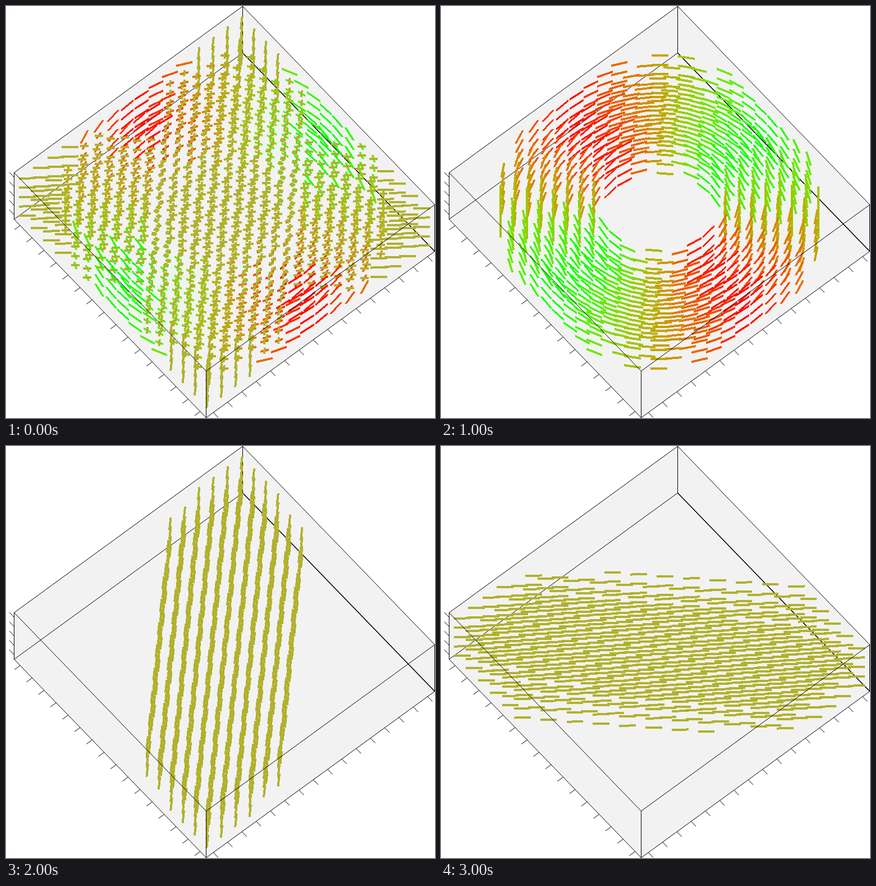
Animation of 764 by 733 pixels, one loop 4000 ms. Source, as a matplotlib script:

```python
import itertools

import matplotlib.pyplot as plt
import numpy as np
from matplotlib.animation import FuncAnimation
from matplotlib.collections import PolyCollection

WIDTH, HEIGHT, DPI = 764, 733, 100
N, LAYERS = 16, 5

# Screen vectors of one cell along each axis of the volume (y points down).
ORIGIN = np.array([14.5, 379.5])
AXES = np.array([[342 / N, 353 / N], [407 / N, -296 / N], [0, -83 / LAYERS]])
NEARNESS = np.array([0.383, -0.322, 0.868])

HALF_LENGTH = 0.457
STICK_WIDTH = 4
RISE = 0.18
FLAT = np.sqrt((1 - RISE ** 2) / 2)
TICK = 0.4


def project(points):
    return ORIGIN + np.asarray(points, float) @ AXES


def bar(segment, width, crisp=False):
    """Line as a parallelogram, its width measured along the minor axis."""
    start, end = segment
    run = end - start
    major = np.argmax(np.abs(run))
    unit = run / abs(run[major])
    if crisp:
        # Without antialiasing every touched pixel is filled, so pull in by
        # half a pixel to fill only those whose centre is covered.
        start, end = start + unit / 2, end - unit / 2
        width -= 1 + abs(unit[1 - major])
    side = np.zeros(2)
    side[1 - major] = width / 2
    return [start - side, end - side, end + side, start + side]


def ring_direction(i, j, k):
    di, dj = i - 7.5, j - 7.5
    r2 = di ** 2 + dj ** 2
    if 10 < r2 < 74:
        return np.array([-dj, di, 0]) / np.sqrt(r2)


def in_tube(along, across, k):
    """Inclined tube running corner to corner through the volume."""
    height = k - 2 - 0.13 * along
    return abs(across) <= 5 and across ** 2 / 2 + height ** 2 < 19.3


def steep_direction(i, j, k):
    if in_tube(i - j, i + j - 15, k):
        return np.array([FLAT, -FLAT, RISE])


def level_direction(i, j, k):
    if in_tube(i + j - 15, i - j, k):
        return np.array([FLAT, FLAT, RISE])


BUNDLES = [ring_direction, steep_direction, level_direction]
SCENES = [BUNDLES] + [[bundle] for bundle in BUNDLES]
CELLS = sorted(itertools.product(range(N), range(N), range(LAYERS)),
               key=lambda cell: NEARNESS @ cell)


def sticks(bundles):
    """Bars and colours; sticks sharing a cell split its length."""
    bars, colors = [], []
    for cell in CELLS:
        directions = [d for d in (b(*cell) for b in bundles) if d is not None]
        center = np.array(cell) + 0.5
        for d in directions:
            half = d * HALF_LENGTH / len(directions)
            segment = project([center - half, center + half])
            bars.append(bar(segment, STICK_WIDTH, crisp=True))
            green, red, blue = np.abs(d)
            colors.append((red, green, blue))
    return bars, colors


def box_edges():
    """Split the box edges into those behind and those before the sticks."""
    size = np.array([N, N, LAYERS])
    back, front = [], []
    for start in itertools.product((0, 1), repeat=3):
        for axis in range(3):
            if start[axis]:
                continue
            end = list(start)
            end[axis] = 1
            hidden = (0, 1, 0) in (start, tuple(end))
            edge = project([start * size, end * size])
            (back if hidden else front).append(edge)
    return back, front


def ticks():
    marks = []
    for n in np.arange(N) + 0.5:
        marks.append(project([(n, 0, 0), (n, -TICK, 0)]))
        marks.append(project([(N, n, 0), (N + TICK, n, 0)]))
    for n in np.arange(LAYERS) + 0.5:
        marks.append(project([(0, 0, n), (-TICK, 0, n)]))
    return marks


fig = plt.figure(figsize=(WIDTH / DPI, HEIGHT / DPI), dpi=DPI, facecolor="white")
ax = fig.add_axes([0, 0, 1, 1])
ax.set(xlim=(0, WIDTH), ylim=(HEIGHT, 0))
ax.axis("off")


def add_bars(bars, zorder, antialiased=True):
    shapes = PolyCollection(bars, facecolors="black", linewidths=0, snap=False,
                            antialiaseds=antialiased, zorder=zorder)
    return ax.add_collection(shapes, autolim=False)


outline = project([(0, 0, 0), (N, 0, 0), (N, N, 0),
                   (N, N, LAYERS), (0, N, LAYERS), (0, 0, LAYERS)])
ax.fill(*outline.T, color="#f2f2f2", linewidth=0, zorder=0)

back_edges, front_edges = box_edges()
heavy_edge = project([(0, N, 0), (N, N, 0)])
add_bars([bar(edge, 1) for edge in back_edges] + [bar(heavy_edge, 2)], 1)
add_bars([bar(line, 1) for line in front_edges + ticks()], 3)
stick_bars = add_bars([], 2, antialiased=False)


def update(frame):
    bars, colors = sticks(SCENES[frame])
    stick_bars.set_verts(bars)
    stick_bars.set_facecolor(colors)
    return [stick_bars]


animation = FuncAnimation(fig, update, frames=len(SCENES), interval=1000,
                          repeat=True, repeat_delay=0)
plt.show()
```
